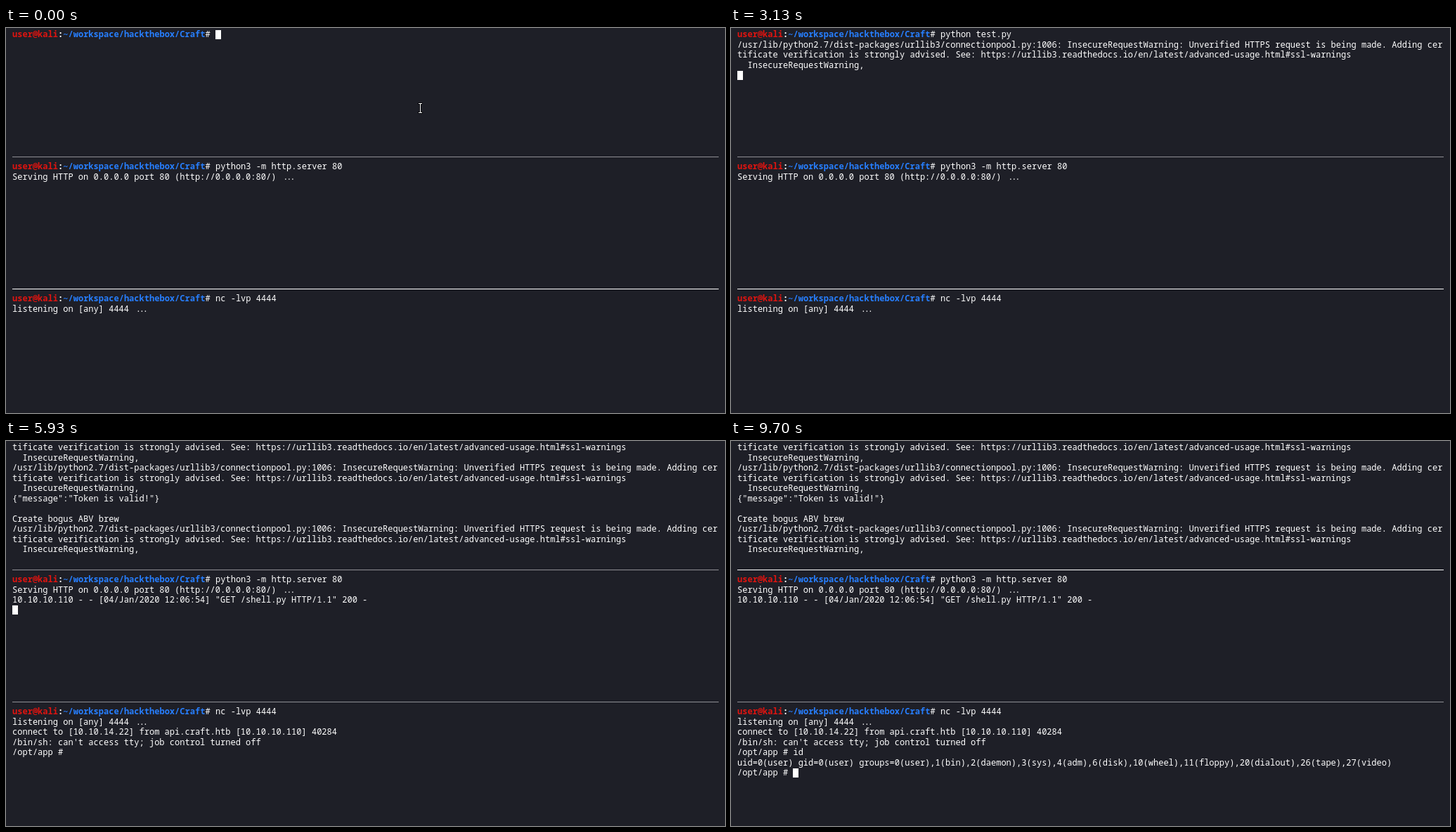
An HTML page with a canvas that plays this animation: 1023x548 px, repeating every 9760 ms.

```html
<!DOCTYPE html>
<html lang="en">
<head>
<meta charset="utf-8">
<title>Terminal session</title>
<style>
  html, body { margin: 0; width: 100%; height: 100%; overflow: hidden; background: #1e1f27; }
  canvas { display: block; }
</style>
</head>
<body>
<canvas id="stage" width="1023" height="548"></canvas>
<script>
const ctx = document.getElementById('stage').getContext('2d');
const LOOP = 9760;
const LEFT = 9, COL = 7.225, ROW = 14.46;
const PANE_ROWS = 12;
const COLORS = { back: '#1e1f27', text: '#ffffff', host: '#e01410', path: '#277fff', activeRule: '#8f8f94' };
const FONT = '12.042px "Noto Sans Mono", "DejaVu Sans Mono", monospace';

const PROMPT = [
  ['user@kali', COLORS.host, 'bold'],
  [':', COLORS.text, 'bold'],
  ['~/workspace/hackthebox/Craft', COLORS.path, 'bold'],
  ['# ', COLORS.text, '500']
];
const PROMPT_COLS = PROMPT.reduce((n, [s]) => n + s.length, 0);

const WARNING = [
  '/usr/lib/python2.7/dist-packages/urllib3/connectionpool.py:1006: InsecureRequestWarning: Unverified HTTPS request is being made. Adding cer',
  'tificate verification is strongly advised. See: https://urllib3.readthedocs.io/en/latest/advanced-usage.html#ssl-warnings',
  '  InsecureRequestWarning,'
];

// Keystroke times, one per character.
const COMMAND = 'python test.py';
const COMMAND_KEYS = [1470, 1560, 1630, 1700, 1770, 1840, 1930, 2070, 2150, 2230, 2300, 2370, 2500, 2600];
const ID_KEYS = [6480, 6620];

const ENTER = 2800, ID_ENTER = 6900, ID_OUTPUT = 7030;
const FOCUS_MIDDLE = 5600, FOCUS_BOTTOM = 5960;

const TOP_OUTPUT = [
  [3080, ...WARNING],
  [3300, ...WARNING],
  [3470, '{"message":"Token is valid!"}', '', 'Create bogus ABV brew'],
  [3560, ...WARNING]
];
const MIDDLE_OUTPUT = [
  [0, 'Serving HTTP on 0.0.0.0 port 80 (http://0.0.0.0:80/) ...'],
  [3780, '10.10.10.110 - - [04/Jan/2020 12:06:54] "GET /shell.py HTTP/1.1" 200 -']
];
const BOTTOM_OUTPUT = [
  [0, 'listening on [any] 4444 ...'],
  [3900, 'connect to [10.10.14.22] from api.craft.htb [10.10.10.110] 40284'],
  [3970, "/bin/sh: can't access tty; job control turned off"]
];

const typed = (text, keys, t) => text.slice(0, keys.filter(k => k <= t).length);
const printed = (output, t) =>
  output.filter(([at]) => at <= t).flatMap(([, ...lines]) => lines);

// The last line of each pane holds its cursor.
function topLines(t) {
  const lines = [typed(COMMAND, COMMAND_KEYS, t)];
  return t < ENTER ? lines : [...lines, ...printed(TOP_OUTPUT, t), ''];
}

function middleLines(t) {
  return ['python3 -m http.server 80', ...printed(MIDDLE_OUTPUT, t), ''];
}

function bottomLines(t) {
  const lines = ['nc -lvp 4444', ...printed(BOTTOM_OUTPUT, t)];
  if (t < 4000) return [...lines, ''];
  lines.push('/opt/app # ' + typed('id', ID_KEYS, t));
  if (t >= ID_OUTPUT) {
    lines.push('uid=0(user) gid=0(user) groups=0(user),1(bin),2(daemon),3(sys),4(adm),6(disk),10(wheel),11(floppy),20(dialout),26(tape),27(video)', '/opt/app # ');
  } else if (t >= ID_ENTER) {
    lines.push('');
  }
  return lines;
}

const colX = col => LEFT + col * COL;

function drawText(text, col, row, color = COLORS.text, weight = '500') {
  const y = Math.round(13.4 + row * ROW);
  ctx.font = `${weight} ${FONT}`;
  ctx.fillStyle = color;
  const ellipsis = text.endsWith('...');
  const body = ellipsis ? text.slice(0, -3) : text;
  ctx.fillText(body, colX(col), y);
  if (ellipsis) {
    // The ellipsis is set tighter than the character grid.
    const x = colX(col + body.length + 1);
    for (const dx of [-5, 0, 5]) ctx.fillText('.', x + dx, y);
  }
}

function drawPrompt(row) {
  let col = 0;
  for (const [text, color, weight] of PROMPT) {
    drawText(text, col, row, color, weight);
    col += text.length;
  }
}

function drawPane(lines, firstRow, active) {
  const skip = Math.max(0, lines.length - PANE_ROWS);
  lines.slice(skip).forEach((line, i) => {
    const hasPrompt = i + skip === 0;
    if (hasPrompt) drawPrompt(firstRow + i);
    drawText(line, hasPrompt ? PROMPT_COLS : 0, firstRow + i);
  });
  if (!active) return;
  const last = lines.length - 1;
  const col = lines[last].length + (last === 0 ? PROMPT_COLS : 0);
  ctx.fillStyle = COLORS.text;
  ctx.fillRect(Math.round(colX(col)), Math.round(2.8 + (firstRow + last - skip) * ROW), 8, 13);
}

function drawRule(y, active) {
  ctx.fillStyle = active ? COLORS.activeRule : COLORS.text;
  ctx.fillRect(LEFT, y, 1005, 1);
}

// Text pointer that leaves through the top edge.
function drawPointer(t) {
  if (t >= 230) return;
  const p = Math.max(0, (t - 20) / 210);
  const x = Math.round(590 + 40 * p), y = Math.round(114 - 124 * p * p);
  const beam = (grow, color) => {
    ctx.fillStyle = color;
    ctx.fillRect(x - 1 - grow, y - 7 - grow, 1 + 2 * grow, 14 + 2 * grow);
    for (const dy of [-7, 6]) ctx.fillRect(x - 3 - grow, y + dy - grow, 5 + 2 * grow, 1 + 2 * grow);
  };
  beam(1, '#08080c');
  beam(0, '#ffffff');
}

function draw(t) {
  const focus = t < FOCUS_MIDDLE ? 0 : t < FOCUS_BOTTOM ? 1 : 2;
  ctx.fillStyle = COLORS.back;
  ctx.fillRect(0, 0, 1023, 548);
  [topLines, middleLines, bottomLines].forEach((lines, i) =>
    drawPane(lines(t), i * (PANE_ROWS + 1), focus === i));
  drawRule(183, focus < 2);
  drawRule(371, focus > 0);
  drawPointer(t);
}

const start = performance.now();
function tick() {
  draw((performance.now() - start) % LOOP);
  requestAnimationFrame(tick);
}
tick();
</script>
</body>
</html>
```
